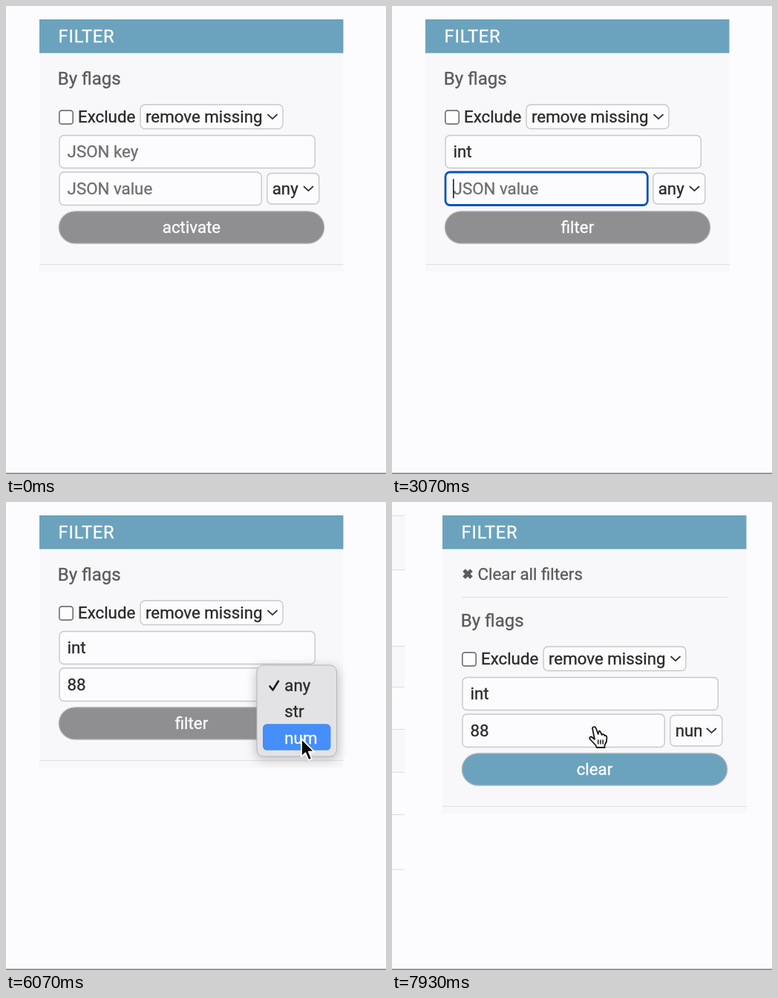
An HTML page for the animation above (8 s loop, 512 by 631 pixels).

```html
<!DOCTYPE html>
<html lang="en">
<head>
<meta charset="utf-8">
<title>Filter panel</title>
<style>
  html, body { margin: 0; width: 100%; height: 100%; overflow: hidden; background: #fcfcfe; }
  svg { display: block; width: 100vw; height: 100vh; }
  text { font: 22.3px Roboto, sans-serif; color: #2b2b2b; fill: currentColor; stroke: currentColor; stroke-width: .35; white-space: pre; }
  .box { fill: #fcfcfe; stroke: #c8c8c9; stroke-width: 1.4; }
  .focus { stroke: #0a52bd; stroke-width: 2.8; }
  .hint { color: #6f6f70; }
  .soft { color: #5b5b5c; }
  .light { color: #fdfdfe; }
  .rule { stroke: #e0e0e3; stroke-width: 1.2; }
  .line { fill: none; stroke: #333; stroke-width: 1.8; stroke-linecap: round; stroke-linejoin: round; }
  .tick { fill: none; stroke: #1c1c1c; stroke-width: 2.6; stroke-linecap: round; stroke-linejoin: round; }
  .ink { stroke: #fff; stroke-width: 1.8; stroke-linejoin: round; }
</style>
</head>
<body>
<svg viewBox="0 0 512 631" preserveAspectRatio="xMinYMin meet">
  <defs>
    <filter id="blur" x="-30%" y="-30%" width="160%" height="160%"><feGaussianBlur stdDeviation="7"/></filter>
    <clipPath id="typeClip"><rect x="352" y="226" width="42" height="40"/></clipPath>
  </defs>
  <rect width="512" height="631" fill="#fcfcfe"/>
  <g id="rows"></g>

  <g id="panel">
    <rect id="back" x="45" y="63" width="409.5" fill="#f8f8fa"/>
    <rect x="45" y="18" width="409.5" height="45.5" fill="#6ba3be"/>
    <text class="light" x="70.6" y="49" style="font-size:23.6px;letter-spacing:.8px">FILTER</text>
    <g id="clearAll">
      <path d="M74 92l10 10M84 92l-10 10" stroke="#5b5b5c" stroke-width="5"/>
      <text class="soft" x="92.5" y="105">Clear all filters</text>
      <path class="rule" d="M71 128.5H429"/>
    </g>

    <g id="form">
      <text class="soft" x="69.8" y="106" style="font-size:24px">By flags</text>
      <rect x="71.8" y="140.8" width="18.4" height="18.4" rx="3.5" fill="#fdfdfe" stroke="#737374" stroke-width="1.7"/>
      <text x="97" y="157">Exclude</text>
      <rect class="box" x="181" y="133" width="192" height="32.5" rx="6"/>
      <text x="188" y="157">remove missing</text>
      <path class="line" d="M353 146.5l6 5.7 6-5.7"/>

      <rect id="keyBox" x="72" y="174.5" width="344.3" height="44" rx="6"/>
      <text id="keyText" x="82.6" y="204.3"></text>
      <rect id="valueBox" x="72" y="224" width="272.3" height="44.5" rx="6"/>
      <text id="valueText" x="82.6" y="254.3"></text>
      <rect id="caret" width="1.6" height="26" fill="#222"/>

      <rect id="typeBox" x="351.8" y="225.5" width="70" height="41.5" rx="6"/>
      <g clip-path="url(#typeClip)"><text id="typeText" x="358.7" y="254.3"></text></g>
      <path class="line" d="M401.5 243.5l6 5.7 6-5.7"/>

      <rect id="button" x="71.3" y="276.8" width="357.4" height="43.4" rx="21.7" stroke="#b8b8b8" stroke-width="1.3"/>
      <text id="label" class="light" x="250" y="306.3" text-anchor="middle"></text>
      <path class="rule" d="M45 348.5H454.5"/>
    </g>
  </g>

  <g id="menu">
    <rect x="336" y="222" width="112" height="126" rx="12" fill="#8c8c90" opacity=".5" filter="url(#blur)"/>
    <rect x="338" y="220" width="107.5" height="123" rx="9" fill="#e3e3e5" stroke="#b7b7b9"/>
    <rect id="glow" x="346" width="91.5" height="35.5" rx="5.5" fill="#458ef9"/>
    <path id="tick" class="tick" d="M355.5 248.5l4 5 7.5-12"/>
    <g id="items"></g>
  </g>

  <path id="arrow" class="ink" fill="#0b0b0b" d="M0 0V24.5L5.5 19.3 9.6 29 14 27.1 9.9 17.6H17.4Z"/>
  <g id="hand">
    <path d="M-2 1C-1.5-1.4 1.8-1.4 2.8 1L5.8 9C7-.2 10 8 10.7 10 12 8.5 14 9 14.3 11 16 10.3 17.5 11.5 17.4 13.5L17 19 14.5 24V27H3.8L2.5 24-5.5 15.5C-6.6 13.5-4.5 11.5-2.3 13.2L1 16Z"
      fill="#fdfdfd" stroke="#161616" stroke-width="1.8" stroke-linejoin="round"/>
    <path d="M5.8 16.5V22.5M9 16.5V22.5M12.2 16.5V22.5" stroke="#161616" stroke-width="1.5"/>
  </g>
  <rect y="629.5" width="512" height="1.5" fill="#7c7c7c"/>
</svg>

<script>
const LOOP = 8000;
const AT = { focusKey: 1000, focusValue: 2900, mouse: 4430, open: 4900, pick: 6330, reload: 7550 };
const KEYS = [[1880, 'i'], [2010, 'in'], [2150, 'int']];
const DIGITS = [[3500, '8'], [3800, '88']];
const PATH = [
  [4430, 482, 300], [4800, 402, 235], [5300, 402, 235],
  [5900, 398, 319], [6450, 398, 319], [7050, 272, 304]
];
const OPTIONS = ['any', 'str', 'num'];
const el = {};
document.querySelectorAll('[id]').forEach(n => el[n.id] = n);

el.rows.innerHTML =
  [[18, 73], [194, 55], [306, 58]].map(([y, h]) => `<rect y="${y}" width="17" height="${h}" fill="#f8f8fa"/>`).join('') +
  [18.5, 91.5, 194.5, 249.5, 306.5, 364.5, 421.5, 495.5].map(y => `<path class="rule" d="M0 ${y}H17"/>`).join('');
el.items.innerHTML = OPTIONS.map((o, i) => `<text x="375.3" y="${254.5 + i * 35.7}">${o}</text>`).join('');

const show = (node, on) => node.setAttribute('visibility', on ? 'visible' : 'hidden');
const move = (node, x, y) => node.setAttribute('transform', `translate(${x} ${y})`);
const typed = (steps, t) => steps.reduce((s, [at, str]) => t >= at ? str : s, '');

function mouseAt(t) {
  const i = PATH.findIndex(p => p[0] > t);
  if (i < 0) return PATH[PATH.length - 1].slice(1);
  if (i === 0) return PATH[0].slice(1);
  const [a, b] = [PATH[i - 1], PATH[i]];
  const u = (t - a[0]) / (b[0] - a[0]), e = u * u * (3 - 2 * u);
  return [a[1] + (b[1] - a[1]) * e, a[2] + (b[2] - a[2]) * e];
}

function field(box, label, text, hint, focused) {
  box.setAttribute('class', focused ? 'box focus' : 'box');
  label.textContent = text || hint;
  label.setAttribute('class', text ? '' : 'hint');
  if (focused) {
    const x = 82 + (text ? label.getComputedTextLength() : 0);
    move(el.caret, x, +label.getAttribute('y') - 21);
  }
}

function draw(t) {
  const done = t >= AT.reload, open = t >= AT.open && t < AT.pick;
  const onKey = t >= AT.focusKey && t < AT.focusValue;
  const onValue = t >= AT.focusValue && t < AT.open;

  move(el.panel, done ? 23 : 0, 0);
  move(el.form, 0, done ? 62 : 0);
  el.back.setAttribute('height', done ? 357 : 295);
  show(el.rows, done);
  show(el.clearAll, done);

  field(el.keyBox, el.keyText, typed(KEYS, t), 'JSON key', onKey);
  field(el.valueBox, el.valueText, typed(DIGITS, t), 'JSON value', onValue);
  show(el.caret, onKey || onValue);
  el.typeBox.setAttribute('class', t >= AT.pick && !done ? 'box focus' : 'box');
  el.typeText.textContent = t < AT.pick ? 'any' : 'num';

  el.label.textContent = done ? 'clear' : t < AT.focusValue ? 'activate' : 'filter';
  el.button.setAttribute('fill', done ? '#6ba3be' : '#8f8f91');

  const [x, y] = mouseAt(t);
  const row = y < 265 ? 0 : y < 300 ? 1 : 2;
  show(el.menu, open);
  el.glow.setAttribute('y', 228.3 + row * 35.5);
  el.tick.style.stroke = row ? '' : '#fff';
  [...el.items.children].forEach((n, i) => n.setAttribute('class', i === row ? 'light' : ''));

  const overButton = t > AT.pick && x < 429 && y < 320.5 && y > 276;
  show(el.arrow, t >= AT.mouse && !overButton);
  show(el.hand, overButton);
  move(el.arrow, x, y);
  move(el.hand, x, y);
}

const start = performance.now();
function tick() {
  draw((performance.now() - start) % LOOP);
  requestAnimationFrame(tick);
}
tick();
</script>
</body>
</html>
```
